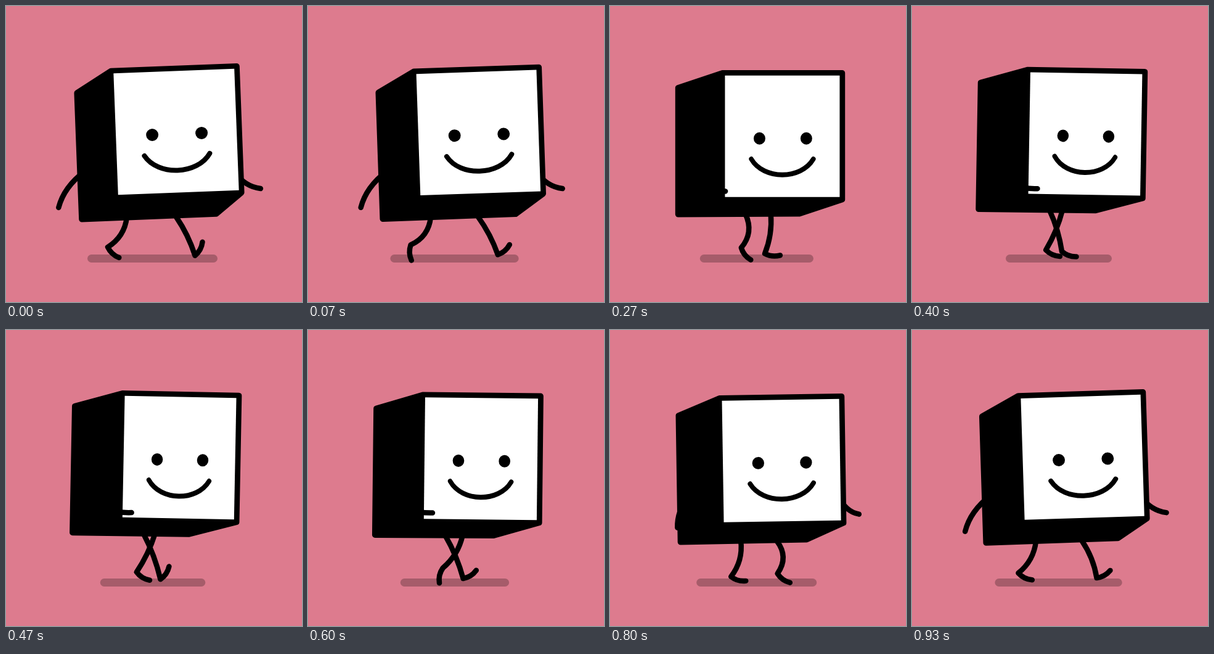
An HTML page with a canvas for the animation above (0.99 s loop, 480 by 480 pixels).

```html
<!DOCTYPE html>
<html lang="en">
<head>
<meta charset="utf-8">
<title>Walking cube</title>
<style>
  html, body { margin: 0; width: 100%; height: 100%; overflow: hidden; background: #dd7b8e; }
  canvas { display: block; }
</style>
</head>
<body>
<canvas id="stage" width="480" height="480"></canvas>
<script>
const ctx = document.getElementById('stage').getContext('2d');
const LOOP = 990, STEPS = 15;
const FACE_WIDTH = 196, FACE_HEIGHT = 197, BORDER = 4, FOOT = 25, LEG = 72;

// [step, how far the cube has turned to the side]
const turnKeys = [[0, 0], [3, .5], [6, 1], [9, .89], [10, .69], [12, .41], [14, .12]];

// One stride: [step, ankle x from hip, ankle y, foot angle in degrees]
const stride = [
  [1.5, 29, 403, -32], [3, 5, 404, -14], [4.5, -16, 400, 16],
  [7.5, -31, 391, 43], [9, -32, 386, 103], [10.2, -27, 384, 98],
  [12, 1, 395, 36], [13.5, 20, 398, 20], [14, 24, 402, -29]
];

// Smooth periodic curve through the keys.
function sample(keys, step) {
  const n = keys.length;
  if (step < keys[0][0]) step += STEPS;
  let i = n - 1;
  while (keys[i][0] > step) i--;
  const row = j => keys[(j + n) % n];
  const time = j => row(j)[0] + STEPS * Math.floor(j / n);
  const span = time(i + 1) - time(i), u = (step - time(i)) / span;
  return row(i).slice(1).map((a, c) => {
    const value = j => row(j)[c + 1];
    const slope = j => (value(j + 1) - value(j)) / (time(j + 1) - time(j));
    const tangent = j => {
      const before = time(j) - time(j - 1), after = time(j + 1) - time(j);
      return (slope(j - 1) * after + slope(j) * before) / (before + after);
    };
    return a + (value(i + 1) - a) * u * u * (3 - 2 * u)
      + span * u * (1 - u) * (tangent(i) * (1 - u) - tangent(i + 1) * u);
  });
}

function strokeLine(width, color = '#000') {
  ctx.lineWidth = width;
  ctx.strokeStyle = color;
  ctx.stroke();
}

// Quadratic segment bulging sideways from the straight line.
function bow(x0, y0, x1, y1, bulge) {
  const dx = x1 - x0, dy = y1 - y0, k = bulge / Math.hypot(dx, dy);
  ctx.quadraticCurveTo((x0 + x1) / 2 + dy * k, (y0 + y1) / 2 - dx * k, x1, y1);
}

// The knee bends more the closer the ankle is to the hip.
function leg(hipX, hipY, step) {
  const [offset, y, degrees] = sample(stride, step % STEPS);
  const x = hipX + offset, angle = degrees * Math.PI / 180;
  ctx.beginPath();
  ctx.moveTo(hipX, hipY);
  bow(hipX, hipY, x, y, Math.max(5, LEG - Math.hypot(offset, y - hipY)));
  bow(x, y, x + FOOT * Math.cos(angle), y + FOOT * Math.sin(angle), -5);
  strokeLine(8.5);
}

function arm(x, y, ...curve) {
  ctx.beginPath();
  ctx.moveTo(x, y);
  ctx.quadraticCurveTo(...curve);
  strokeLine(8.5);
}

function face() {
  ctx.fillStyle = '#fff';
  ctx.fillRect(-FACE_WIDTH / 2, -FACE_HEIGHT / 2, FACE_WIDTH, FACE_HEIGHT);
  ctx.fillStyle = '#000';
  for (const x of [-39, 41]) {
    ctx.beginPath();
    ctx.arc(x, 3.5, 10, 0, 7);
    ctx.fill();
  }
  ctx.beginPath();
  ctx.moveTo(-53, 37);
  ctx.bezierCurveTo(-32, 71, 32, 71, 53, 37);
  strokeLine(8);
}

function draw(step) {
  const [turn] = sample(turnKeys, step);
  const tilt = -.038 + .055 * turn;
  const width = FACE_WIDTH - 14.5 * turn;
  const centerX = 276 + 5 * turn;
  const centerY = 204 + 3.5 * turn + 7.75 * (1 - Math.abs(2 * turn - 1));

  // Offsets from the front corners to the back ones.
  const side = turn * (1.45 - .45 * turn);
  const backLeft = -55 - 21.5 * side, backRight = -41 - 36 * side;
  const drop = 35.5 - 14.5 * side;
  const swing = 1 / (1 + Math.exp(11.3 * (.53 - turn)));

  ctx.fillStyle = '#dd7b8e';
  ctx.fillRect(0, 0, 480, 480);
  ctx.lineCap = ctx.lineJoin = 'round';

  ctx.beginPath();
  ctx.moveTo(138.5 + 20 * turn, 409.5);
  ctx.lineTo(336.5 - 19 * turn, 409.5);
  strokeLine(13, '#a65c6a');

  const hipY = centerY + FACE_HEIGHT / 2 + BORDER + drop;
  leg(196 + 27 * Math.sin(turn * Math.PI / 2), hipY, step + STEPS / 2);
  leg(276 - 32 * turn * turn, hipY, step);
  arm(371, 270, 388 - 28 * swing, 293 + 9 * swing, 413 - 45 * swing, 296 + 13 * swing);

  const corner = (sx, sy, dx = 0, dy = 0) => {
    const x = sx * (width / 2 + BORDER), y = sy * (FACE_HEIGHT / 2 + BORDER);
    const cos = Math.cos(tilt), sin = Math.sin(tilt);
    ctx.lineTo(centerX + x * cos - y * sin + dx, centerY + x * sin + y * cos + dy);
  };
  ctx.beginPath();
  corner(-1, -1);
  corner(1, -1);
  corner(1, 1);
  corner(1, 1, backRight, drop - 1);
  corner(-1, 1, backLeft, drop);
  corner(-1, -1, backLeft, drop);
  ctx.closePath();
  ctx.fillStyle = '#000';
  ctx.fill();
  strokeLine(9.5);

  ctx.save();
  ctx.translate(centerX, centerY);
  ctx.rotate(tilt);
  ctx.scale(width / FACE_WIDTH, 1);
  face();
  ctx.restore();

  arm(128, 268, 94 + 70 * swing, 293 + 5 * swing, 85 + 119 * swing, 327 - 31 * swing);
}

// Fifteen held steps per loop, on a 10 ms clock.
function tick() {
  const t = Math.floor(performance.now() % LOOP / 10) * 10;
  draw(Math.floor((t + 5) * 3 / 200));
  requestAnimationFrame(tick);
}
tick();
</script>
</body>
</html>
```
